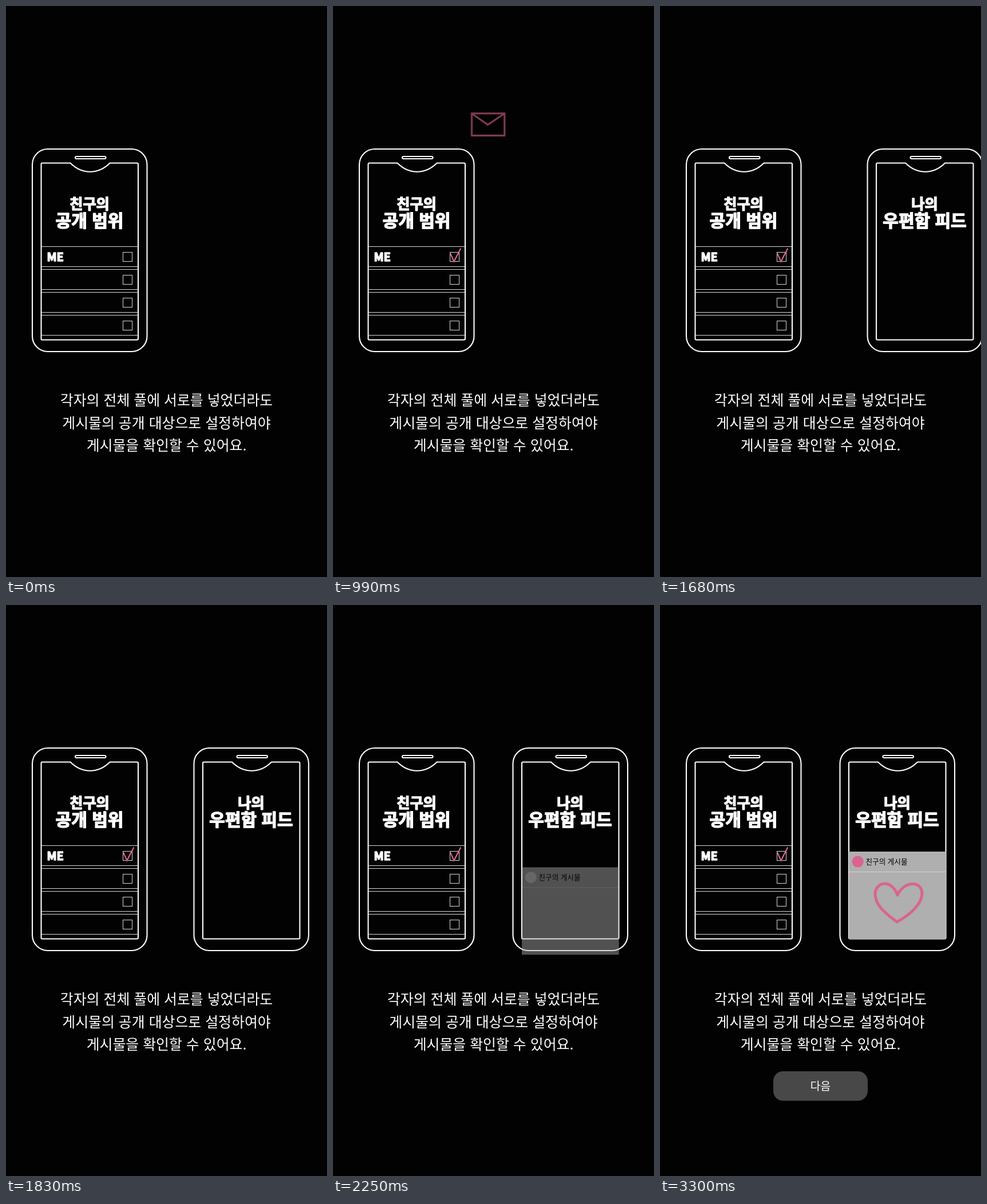
These frames come from a looping animation (561x998 px, 4200 ms). An HTML page:

```html
<!DOCTYPE html>
<html lang="ko">
<head>
<meta charset="utf-8">
<title>공개 범위 안내</title>
<style>
  html, body { margin: 0; width: 100%; height: 100%; overflow: hidden; background: #020202; }
  svg { display: block; width: 100vw; height: 100vh; }
  text { font-family: "Noto Sans CJK KR", "Noto Sans CJK", "Noto Sans CJK JP", sans-serif; fill: #fff; }

  .line { fill: none; stroke: #fff; stroke-width: 2.1; }
  .thin { fill: none; stroke: #d8d8d8; stroke-width: 1; }
  .pink { fill: none; stroke: #d9648f; }
  .mid { text-anchor: middle; }
  /* The outline thickens the bold face to a rounded, extra heavy one. */
  .heavy { font-weight: 900; stroke: #fff; stroke-width: 1.5; stroke-linejoin: round; }
  .small-title { font-size: 25.2px; }
  .big-title { font-size: 30px; }
  .caption { font-size: 24.9px; }

  /* Every track shares one 4200 ms loop. */
  .check, .check path, .mail, .mail g, .phone, .card, .card-fade, .dot, .heart, .button {
    animation: 4200ms linear infinite both;
  }
  .check { animation-name: check-fade; }
  .check path { animation-name: stamp; transform-origin: 213.5px 438px; }
  .mail { animation-name: mail-fade; }
  .mail g { animation-name: mail-move; }
  .phone { animation-name: phone-slide; }
  .card { animation-name: card-rise; }
  .card-fade { animation-name: card-fade; }
  .dot { animation-name: dot-fade; }
  .heart { animation-name: heart-fade; }
  .button { animation-name: button-fade; }

  @keyframes check-fade { 0% { opacity: 0; } 14.286%, 100% { opacity: 1; } }
  @keyframes stamp {
    0%, 13.333% { transform: scale(3.9); }
    14.286%, 100% { transform: scale(1); }
  }
  @keyframes mail-fade {
    0% { opacity: 0; }
    14.286%, 17.857% { opacity: 1; }
    32.143%, 100% { opacity: 0; }
  }
  @keyframes mail-move {
    0%, 17.857% { transform: translateX(0); animation-timing-function: ease-in-out; }
    32.143%, 100% { transform: translateX(133px); }
  }
  @keyframes phone-slide {
    0%, 32.143% { transform: translateX(380px); }
    34.286% { transform: translateX(245px); animation-timing-function: cubic-bezier(.2, .76, .39, 1); }
    50%, 100% { transform: translateX(0); }
  }
  @keyframes card-rise {
    0%, 50.714% { transform: translateY(30px); animation-timing-function: cubic-bezier(.65, 0, .35, 1); }
    61.429%, 100% { transform: translateY(0); }
  }
  @keyframes card-fade { 0%, 50.714% { opacity: 0; } 56.95%, 100% { opacity: 1; } }
  @keyframes dot-fade { 0%, 59.524% { opacity: 0; } 66.667%, 100% { opacity: 1; } }
  @keyframes heart-fade { 0%, 61.429% { opacity: 0; } 71.429%, 100% { opacity: 1; } }
  @keyframes button-fade { 0%, 69.286% { opacity: 0; } 78.571%, 100% { opacity: 1; } }
</style>
</head>
<body>
<svg viewBox="0 0 561 998">
  <defs>
    <g id="frame" class="line">
      <rect x="46" y="250" width="200.5" height="354" rx="27"/>
      <rect x="121" y="263" width="53.5" height="4" rx="2"/>
      <path d="M63.5 274.5H112.5C122 284 133 289.7 147 289.7S172 284 181.5 274.5H229Q231 274.5 231 276.5V581.5Q231 583.5 229 583.5H63.5Q61.5 583.5 61.5 581.5V276.5Q61.5 274.5 63.5 274.5Z"/>
    </g>
    <g id="row" class="thin">
      <path d="M62 420.5H231M62 455.5H231"/>
      <rect x="204.5" y="430.5" width="16" height="16"/>
    </g>
  </defs>

  <use href="#frame"/>
  <text class="mid heavy small-title" x="146" y="354.5">친구의</text>
  <text class="mid heavy big-title" x="146" y="386">공개 범위</text>
  <use href="#row"/>
  <use href="#row" y="40"/>
  <use href="#row" y="80"/>
  <use href="#row" y="120"/>
  <text class="heavy" x="71.5" y="445.5" font-size="20">ME</text>

  <g class="check"><path class="pink" stroke-width="2.2" d="M205 432.5L211.5 446.5L223.3 423.5"/></g>

  <g class="mail"><g class="pink" stroke-width="3.2">
    <rect x="198" y="187.8" width="57.3" height="38.6"/>
    <path d="M198 188L226 207.5L255 188"/>
  </g></g>

  <g class="phone">
    <use href="#frame" x="268.5"/>
    <text class="mid heavy small-title" x="414.5" y="354.5">나의</text>
    <text class="mid heavy big-title" x="414.5" y="386">우편함 피드</text>
  </g>

  <g class="card"><g class="card-fade">
    <rect x="330" y="431" width="169.7" height="153" fill="#afafaf"/>
    <path d="M330 466.5H499.7" stroke="#d4d4d4"/>
    <circle cx="345.7" cy="448.5" r="10" fill="#dcdcdc"/>
    <circle class="dot" cx="345.7" cy="448.5" r="10.2" fill="#d9648f"/>
    <text x="359.5" y="453" font-size="12.6" style="fill:#000">친구의 게시물</text>
    <path class="heart pink" stroke-width="5" stroke-linejoin="round"
      d="M415 507C411 495 402 487 393 487C383 487 376 495 376 505C376 526 396 540 414 554C436 542 458 523 458 504C458 494 451 487.5 442 487.5C430 487.5 420 496 415 507Z"/>
  </g></g>

  <g class="mid caption">
    <text x="280.5" y="698">각자의 전체 풀에 서로를 넣었더라도</text>
    <text x="280.5" y="737.5">게시물의 공개 대상으로 설정하여야</text>
    <text x="280.5" y="777">게시물을 확인할 수 있어요.</text>
  </g>

  <g class="button">
    <rect x="198" y="815" width="165" height="51.5" rx="17" fill="#484848"/>
    <text class="mid" x="280.5" y="847.8" font-size="19.2">다음</text>
  </g>
</svg>
</body>
</html>
```
